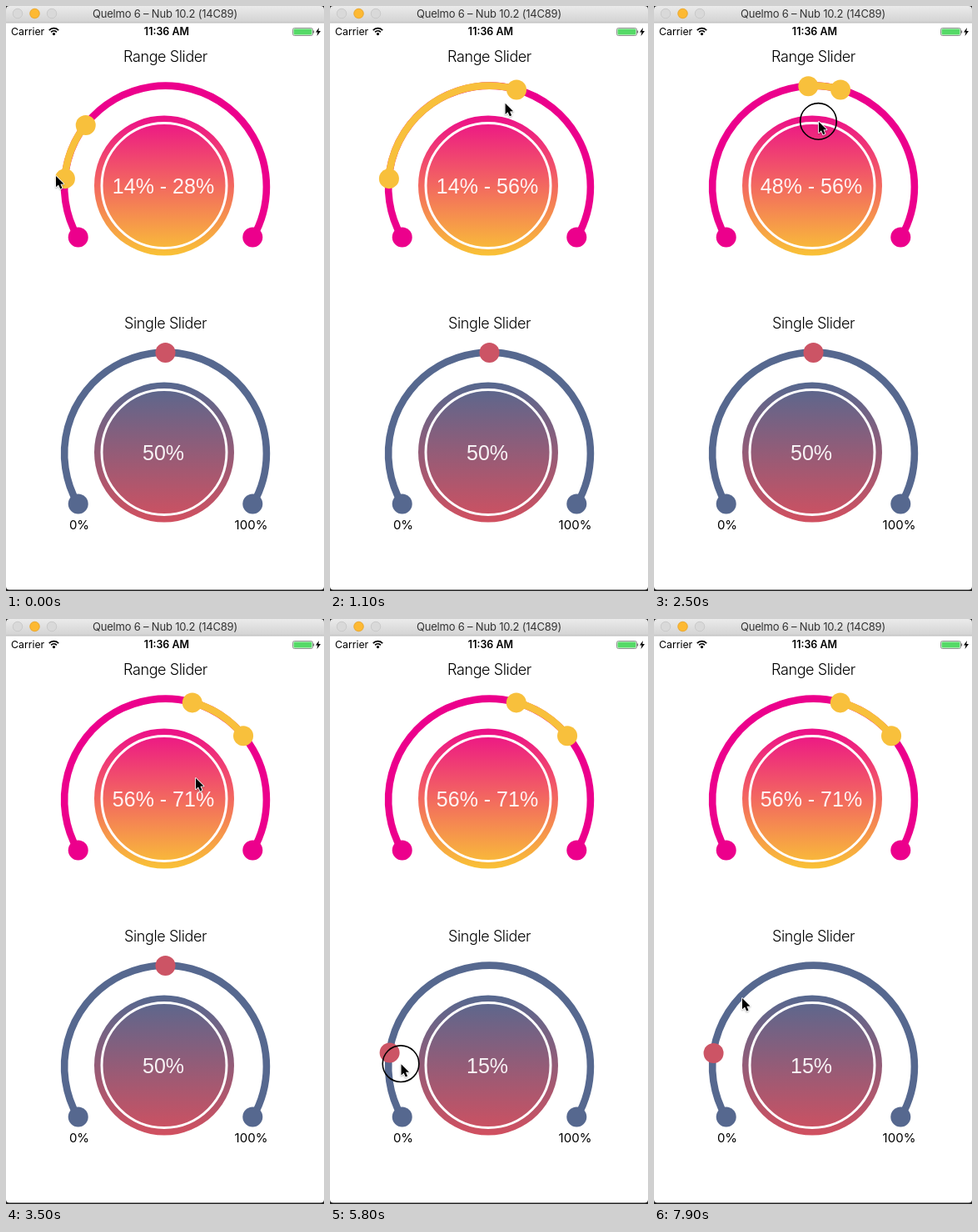
An HTML page with a canvas for the animation above (8 s loop, 382 by 702 pixels).

```html
<!DOCTYPE html>
<html lang="en">
<head>
<meta charset="utf-8">
<title>Circular sliders</title>
<style>
html, body { margin: 0; width: 100%; height: 100%; overflow: hidden; background: #fff; }
canvas { display: block; width: 382px; height: 702px; }
</style>
</head>
<body>
<canvas id="stage"></canvas>
<script>
const W = 382, H = 702, LOOP = 8000, STEP = 100;
const canvas = document.getElementById('stage');
const ctx = canvas.getContext('2d');
const dpr = window.devicePixelRatio || 1;
canvas.width = W * dpr;
canvas.height = H * dpr;

const UI = 'Inter, "Open Sans", sans-serif';
const VALUE = '"Liberation Sans", Arial, sans-serif';
const INK = '#000', PINK = '#ec008c', YELLOW = '#f8c03c', BLUE = '#56688f', RED = '#cc5465';
const CX = 191.5, R = 121, RANGE_Y = 217, SINGLE_Y = 537;

// While dragging, the pointer drifts inwards to `reach` and gains `lead` percent on the knob.
const drags = [
  { knob: 'high', cy: RANGE_Y, start: 300, end: 1050, from: 28.2, to: 56.5, reach: 104, lead: -2 },
  { knob: 'low', cy: RANGE_Y, start: 1900, end: 2725, from: 14.45, to: 56.45, reach: 70, lead: 3.5 },
  { knob: 'high', cy: RANGE_Y, start: 2850, end: 3350, from: 56.5, to: 71.1, reach: 60, lead: 0 },
  { knob: 'single', cy: SINGLE_Y, start: 4500, end: 5840, from: 50, to: 15.66, reach: 107, lead: -2.4 }
];
const rests = [
  { t: 0, x: 59, y: 203 },
  { t: 3500, x: 227, y: 190 },
  { t: 6800, x: 184, y: 98 },
  { t: 7900, x: 105, y: 454 }
];

const mix = (a, b, s) => a + (b - a) * s;

function ease(t, start, end) {
  const u = Math.min(1, Math.max(0, (t - start) / (end - start)));
  return u * u * (3 - 2 * u);
}

function angle(percent) {
  return (150 + percent * 2.4) * Math.PI / 180;
}

function onArc(cy, percent, r = R) {
  const a = angle(percent);
  return { x: CX + r * Math.cos(a), y: cy + r * Math.sin(a) };
}

function value(knob, t) {
  const own = drags.filter(d => d.knob === knob);
  const d = own.filter(d => d.start <= t).pop() || own[0];
  return mix(d.from, d.to, ease(t, d.start, d.end));
}

function grip(d, t) {
  const s = ease(t, d.start, d.end);
  return onArc(d.cy, mix(d.from, d.to, s) + d.lead * s, mix(R, d.reach, s));
}

const stops = rests
  .concat(drags.flatMap(d => [d.start, d.end].map(t => ({ t, ...grip(d, t) }))))
  .sort((a, b) => a.t - b.t);

function pointer(t) {
  const d = drags.find(d => t >= d.start && t <= d.end);
  if (d) return grip(d, t);
  const i = stops.findIndex(p => p.t > t);
  if (i < 0) return stops[stops.length - 1];
  const a = stops[i - 1], b = stops[i], s = ease(t, a.t, b.t);
  return { x: mix(a.x, b.x, s), y: mix(a.y, b.y, s) };
}

function text(str, x, y, font, color = INK, align = 'center', spacing = 0) {
  ctx.font = font;
  ctx.fillStyle = color;
  ctx.textAlign = align;
  ctx.letterSpacing = spacing + 'px';
  ctx.fillText(str, x, y);
}

function disc(x, y, r, color) {
  ctx.beginPath();
  ctx.arc(x, y, r, 0, Math.PI * 2);
  ctx.fillStyle = color;
  ctx.fill();
}

function curve(x, y, r, color, width, from = 0, to = Math.PI * 2) {
  ctx.beginPath();
  ctx.arc(x, y, r, from, to);
  ctx.strokeStyle = color;
  ctx.lineWidth = width;
  ctx.stroke();
}

function shape(points) {
  ctx.beginPath();
  points.forEach(([x, y]) => ctx.lineTo(x, y));
  ctx.closePath();
}

function box(x, y, w, h, r) {
  ctx.beginPath();
  ctx.roundRect(x, y, w, h, r);
}

function fade(y0, y1, top, bottom) {
  const g = ctx.createLinearGradient(0, y0, 0, y1);
  g.addColorStop(0, top);
  g.addColorStop(1, bottom);
  return g;
}

function arc(cy, from, to, color) {
  curve(CX, cy, R + 0.4, color, 8.6, angle(from), angle(to));
}

function knob(cy, percent, color) {
  const p = onArc(cy, percent);
  disc(p.x, p.y, 12, color);
}

function slider(cy, color, top, bottom, title, label) {
  text(title, CX, cy - 150, '300 18px ' + UI, INK, 'center', -0.4);
  arc(cy, 0, 100, color);
  knob(cy, 0, color);
  knob(cy, 100, color);

  const y = cy - 1.5;
  disc(190, y, 84, fade(y - 84, y + 84, top, bottom));
  curve(190, y, 75, '#fff', 3);
  text(label, 189, cy + 8, '25px ' + VALUE, 'rgba(255,255,255,.93)');
}

function windowBar() {
  ctx.fillStyle = fade(0, 20, '#ebebeb', '#d2d2d2');
  ctx.fillRect(0, 0, W, 20);
  ctx.fillStyle = '#b9b9b9';
  ctx.fillRect(0, 19.5, W, 1);
  for (let i = 0; i < 3; i++) {
    const x = 14 + i * 20.5;
    disc(x, 9, 6, i === 1 ? '#fdb933' : '#d9d9d9');
    curve(x, 9, 5.75, i === 1 ? '#e0a030' : '#c2c2c2', 0.7);
  }
  text('Quelmo 6 – Nub 10.2 (14C89)', 191, 14, '13px ' + UI, '#333', 'center', -0.2);
}

function statusBar() {
  text('Carrier', 6, 35, '12.3px ' + UI, INK, 'left');
  text('11:36 AM', 193, 35, '600 12.5px ' + UI);

  for (const r of [4.6, 7.8]) {
    curve(57.5, 34.5, r, INK, 1.7, -Math.PI * 0.76, -Math.PI * 0.24);
  }
  disc(57.5, 33.6, 1.6, INK);

  box(344.5, 26.5, 24, 9, 2);
  ctx.strokeStyle = '#777';
  ctx.lineWidth = 0.8;
  ctx.stroke();
  box(345.5, 27.5, 22, 7, 1);
  ctx.fillStyle = '#55da67';
  ctx.fill();
  ctx.fillStyle = '#777';
  ctx.fillRect(369, 29.5, 1.2, 3);
  shape([[376, 26], [372, 31.5], [374.5, 31.5], [373.5, 36], [378, 30], [375.3, 30]]);
  ctx.fillStyle = INK;
  ctx.fill();
}

function arrow(x, y) {
  ctx.save();
  ctx.translate(x + 1, y + 1);
  ctx.scale(0.92, 0.92);
  shape([[0, 0], [0, 14.5], [3.3, 11.4], [5.7, 16.8], [8.2, 15.7], [5.9, 10.5], [10.3, 10.3]]);
  ctx.lineJoin = 'round';
  ctx.lineWidth = 1.8;
  ctx.strokeStyle = '#fff';
  ctx.shadowColor = 'rgba(0,0,0,.3)';
  ctx.shadowBlur = 2 * dpr;
  ctx.shadowOffsetY = dpr;
  ctx.stroke();
  ctx.shadowColor = 'transparent';
  ctx.fillStyle = INK;
  ctx.fill();
  ctx.restore();
}

function corners() {
  ctx.beginPath();
  ctx.rect(0, 0, W, H);
  ctx.roundRect(0, 0, W, H - 1.5, 4);
  ctx.fillStyle = '#222';
  ctx.fill('evenodd');
}

function draw(t) {
  ctx.setTransform(dpr, 0, 0, dpr, 0, 0);
  ctx.fillStyle = '#fff';
  ctx.fillRect(0, 0, W, H);
  windowBar();
  statusBar();

  const low = value('low', t), high = value('high', t), single = value('single', t);

  slider(RANGE_Y, PINK, '#ec0f89', '#f9c236', 'Range Slider',
    `${Math.floor(low)}% - ${Math.floor(high)}%`);
  arc(RANGE_Y, low, high, YELLOW);
  knob(RANGE_Y, low, YELLOW);
  knob(RANGE_Y, high, YELLOW);

  slider(SINGLE_Y, BLUE, BLUE, '#d15060', 'Single Slider', `${Math.floor(single)}%`);
  knob(SINGLE_Y, single, RED);
  text('0%', 88, 628, '15px ' + UI);
  text('100%', 294.5, 628, '15px ' + UI);

  const p = pointer(t);
  if (drags.some(d => t > d.start - 100 && t < d.end + 50)) {
    curve(p.x + 0.5, p.y + 0.5, 21.8, INK, 1.6);
  }
  arrow(p.x, p.y);
  corners();
}

const start = performance.now();
function tick() {
  const t = (performance.now() - start) % LOOP;
  draw(Math.floor(t / STEP) * STEP);
  requestAnimationFrame(tick);
}
tick();
</script>
</body>
</html>
```
